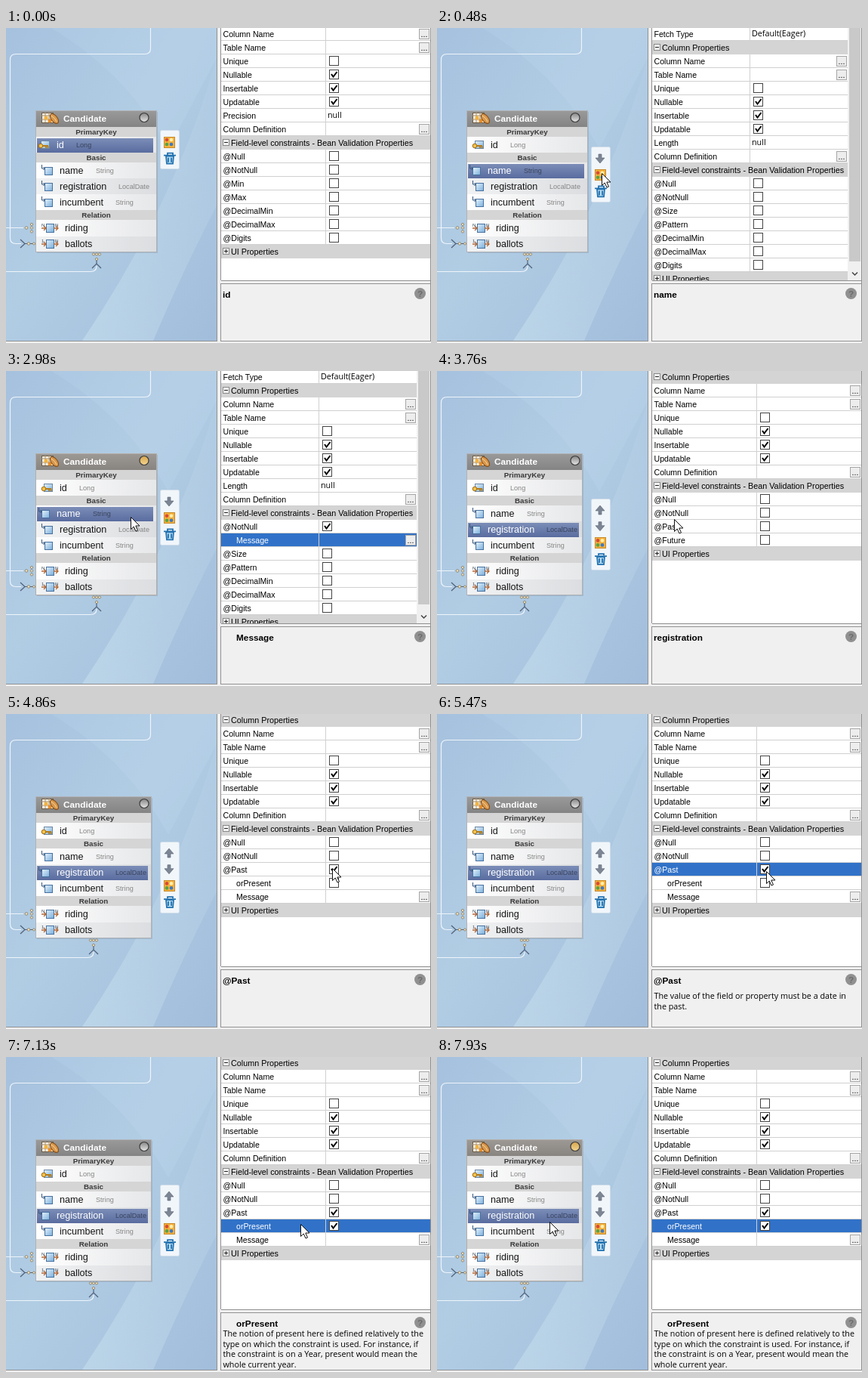
An HTML page that plays this animation: 563x417 px, repeating every 8 s.

```html
<!DOCTYPE html>
<html lang="en">
<head>
<meta charset="utf-8">
<title>Bean validation editor</title>
<style>
html, body { margin: 0; width: 100%; height: 100%; overflow: hidden; background: #f0f0f0; }
svg { display: block; width: 563px; height: 417px; }
text { font: 10.6px "Liberation Sans", Arial, sans-serif; fill: #000; white-space: pre; }
text.section { font-size: 10.8px; }
text.bold { font-size: 11.8px; font-weight: bold; }
text.group { font-size: 9.8px; font-weight: bold; fill: #3a3a3a; text-anchor: middle; }
text.value { font: 10.75px "Open Sans", Tahoma, sans-serif; }
text.attr { font-size: 12.6px; fill: #151515; }
text.type { font-size: 9.1px; fill: #858585; }
text.tiny { font-size: 6px; fill: #345; }
text.light { fill: #fff; }
text.mid { text-anchor: middle; }
rect, .crisp { shape-rendering: crispEdges; }
.soft { shape-rendering: auto; }
.wire { fill: none; stroke: #eef4fa; stroke-width: 1.2; }
.fork { fill: none; stroke: #4f6078; stroke-width: 1.2; }
.dot { fill: #f8e3b8; stroke: #8a8270; stroke-width: .9; }
</style>
</head>
<body>
<svg viewBox="0 0 563 417">
  <defs>
    <linearGradient id="sky" x1="0" y1="0" x2="1" y2="1">
      <stop offset="0" stop-color="#a6c1de"/><stop offset=".45" stop-color="#b1cde4"/><stop offset="1" stop-color="#a2bddb"/>
    </linearGradient>
    <linearGradient id="beam" x1="1" y1="0" x2="0" y2="1">
      <stop offset="0" stop-color="#d8eef6" stop-opacity=".05"/><stop offset="1" stop-color="#d8eef6" stop-opacity=".36"/>
    </linearGradient>
    <linearGradient id="head" x1="0" y1="0" x2="0" y2="1">
      <stop offset="0" stop-color="#999"/><stop offset="1" stop-color="#848484"/>
    </linearGradient>
    <linearGradient id="headHot" x1="0" y1="0" x2="0" y2="1">
      <stop offset="0" stop-color="#9c9894"/><stop offset="1" stop-color="#888480"/>
    </linearGradient>
    <linearGradient id="body"><stop offset="0" stop-color="#fff"/><stop offset="1" stop-color="#e6e7e9"/></linearGradient>
    <linearGradient id="picked" x1="0" y1="0" x2="0" y2="1">
      <stop offset="0" stop-color="#7b8db7"/><stop offset="1" stop-color="#596c9f"/>
    </linearGradient>
    <linearGradient id="silver" x1="0" y1="0" x2="0" y2="1">
      <stop offset="0" stop-color="#858585"/><stop offset="1" stop-color="#e6e6e6"/>
    </linearGradient>
    <linearGradient id="gold" x1="0" y1="0" x2="0" y2="1">
      <stop offset="0" stop-color="#d5a54c"/><stop offset="1" stop-color="#f3d590"/>
    </linearGradient>
    <linearGradient id="glass" x1="0" y1="0" x2="1" y2="1">
      <stop offset="0" stop-color="#e4f2fc"/><stop offset="1" stop-color="#7db0dc"/>
    </linearGradient>

    <!-- Icons are centred on 0,0 -->
    <g id="field">
      <rect x="-4.5" y="-3.5" width="10" height="10" fill="url(#glass)" stroke="#47719f"/>
      <path d="M-8.500-7v5h4M-6.500-4l2 2-2 2" fill="none" stroke="#35557e"/>
    </g>
    <g id="key">
      <rect x="-3.5" y="-4.5" width="11" height="10" fill="url(#glass)" stroke="#6c87a4"/>
      <circle cx="-4" cy="2" r="2.800" fill="#f3c34c" stroke="#a06c12"/>
      <path d="M-1 2H6M3 2v3M5.500 2v3" stroke="#b47d1c" stroke-width="1.800"/>
    </g>
    <g id="link">
      <rect x="-5" y="-5" width="10" height="11" fill="url(#glass)" stroke="#47719f"/>
      <path d="M-11 1h6M-8-2L-5 1l-3 3M5 1h6M8-2l3 3-3 3" fill="none" stroke="#b0683a" stroke-width="1.300"/>
    </g>
    <g id="entity">
      <rect x="-11" y="-7" width="15" height="13" fill="#f6f1e6" stroke="#6c5b44"/>
      <path d="M-11-3H4M-11 2H4M-6-7V6M-1-7V6" stroke="#a98f68"/>
      <circle cx="-5" cy="0" r="2.500" fill="#f3b33e"/><circle cx="0" cy="4" r="2.500" fill="#e88d2c"/>
      <ellipse cx="6" cy="1" rx="4" ry="7.500" transform="rotate(-38 6 1)" fill="#d9974b" stroke="#7e4a18"/>
      <path d="M2-3q5 3 7 8" fill="none" stroke="#f5d6a0"/>
    </g>
    <path id="down" d="M-2-6h4v5h4L0 6-6-1h4z" fill="#7d8694" stroke="#596372" stroke-width=".6"/>
    <g id="up"><use href="#down" transform="scale(1 -1)"/></g>
    <g id="palette">
      <rect x="-7" y="-7" width="14" height="14" fill="#f3b13c" stroke="#c98a2a"/>
      <circle cx="-3" cy="-3" r="2.300" fill="#d84a35"/><circle cx="3" cy="-3" r="2.300" fill="#fff0b0"/>
      <circle cx="-3" cy="3" r="2.300" fill="#56a345"/><circle cx="3" cy="3" r="2.300" fill="#3c78c4"/>
    </g>
    <g id="trash" fill="none" stroke="#2272b0" stroke-width="1.800">
      <path d="M-5-3L-4 7H4L5-3z" fill="#b9dcf3"/><path d="M-8-4H8M-3-5V-7H4v2M-2-1v6M2-1v6"/>
    </g>
    <clipPath id="grid"><rect x="285" width="277" height="334"/></clipPath>
    <clipPath id="canvas"><rect width="279" height="414"/></clipPath>
  </defs>

  <rect width="563" height="417" fill="#f0f0f0"/>
  <g clip-path="url(#canvas)">
    <rect width="279" height="414" fill="url(#sky)"/>
    <path d="M60 0Q160 60 215 160L279 40V0z" fill="#cfe6f2" opacity=".12"/>
    <path d="M279 40Q225 230 101 414H195Q235 320 279 235z" fill="url(#beam)"/>
    <path class="wire" d="M191.500 0V27Q191.500 34.500 184 34.500H13Q5.500 34.500 5.500 42V278Q5.500 285.500 13 285.500H20M0 264.500H23"/>
    <path class="fork" d="M19 280l6 5.500-6 5.500M25 285.500H39"/>
    <g class="dot">
      <circle cx="30" cy="285.500" r="1.800"/><circle cx="37" cy="285.500" r="1.500"/>
      <circle cx="27" cy="264.500" r="1.800"/><circle cx="34" cy="260" r="1.600"/>
      <circle cx="34" cy="264.500" r="1.600"/><circle cx="34" cy="269.500" r="1.600"/>
    </g>
    <g id="card"></g>
  </g>
  <path class="crisp" d="M279.500 0V414M284.500 0V334M284.500 338V414M562.500 0V414M285 334.500H563M285 338.500H563M0 414.500H280M284 414.500H563" stroke="#919191"/>
  <g id="panel"></g>
  <path id="cursor" d="M.5.5V16.500L4.200 13 7 19 9.500 18 6.800 12H12z" fill="#fff" stroke="#111"/>
</svg>

<script>
const LOOP = 8000;
const $ = id => document.getElementById(id);
const rect = (x, y, w, h, fill, extra = '') =>
  `<rect x="${x}" y="${y}" width="${w}" height="${h}" fill="${fill}" ${extra}/>`;
const text = (x, y, s, cls = '') => `<text x="${x}" y="${y}" class="${cls}">${s}</text>`;
const use = (id, x, y) => `<use href="#${id}" x="${x}" y="${y}"/>`;
const path = (d, stroke, extra = '') => `<path d="${d}" fill="none" stroke="${stroke}" ${extra}/>`;

// Rows: "label|value"; 0/1 is a checkbox, "..." a button, a leading -/+ a section
const unset = s => s.split(' ').map(n => `@${n}|0`);
const column = ['Column Name|...', 'Table Name|...', 'Unique|0', 'Nullable|1', 'Insertable|1', 'Updatable|1'];
const section = '-Column Properties';
const definition = 'Column Definition|...';
const bean = '-Field-level constraints - Bean Validation Properties';
const ui = '+UI Properties';
const fetchRows = ['Fetch Type|Default(Eager)', section, ...column, 'Length|null', definition, bean];
const dateRows = [section, ...column, definition, bean, ...unset('Null NotNull')];
const textRules = unset('Size Pattern DecimalMin DecimalMax Digits');
const pastRows = n => [...dateRows, '@Past|1', ` orPresent|${n}`, ' Message|...', ui];

const pastHelp = ['The value of the field or property must be a date in', 'the past.'];
const presentHelp = ['The notion of present here is defined relatively to the',
  'type on which the constraint is used. For instance, if',
  'the constraint is on a Year, present would mean the', 'whole current year.'];

const idRows = [...column, 'Precision|null', definition, bean,
  ...unset('Null NotNull Min Max DecimalMin DecimalMax Digits'), ui];
const scenes = [
  { at: 0, attr: 'id', rows: idRows, title: 'id' },
  { at: 310, attr: 'name', rows: [...fetchRows, ...unset('Null NotNull'), ...textRules, ui], title: 'name', scroll: true },
  { at: 2040, attr: 'name', rows: [...fetchRows, '@NotNull|1', ' Message|...', ...textRules, ui],
    title: ' Message', pick: ' Message', scroll: true },
  { at: 3140, attr: 'registration', rows: [...dateRows, ...unset('Past Future'), ui], title: 'registration' },
  { at: 4860, attr: 'registration', rows: pastRows(0), title: '@Past' },
  { at: 5020, attr: 'registration', rows: pastRows(0), title: '@Past', pick: '@Past', help: pastHelp, helpY: 377 },
  { at: 6670, attr: 'registration', rows: pastRows(1), title: ' orPresent', pick: ' orPresent', help: presentHelp, helpY: 370 },
];

// Cursor moves: first step, last step, steps, x, y; no position hides it
const moves = [
  [160, 160, 1, 150, 190], [470, 620, 2, 286, 193],
  [940, 1580, 5, 431, 219], [1740, 1740, 1, 428, 221], [2520],
  [2820, 2820, 1, 178, 188], [2980, 2980, 1, 165, 193], [3140, 3140, 1, 152, 207],
  [3460, 3760, 3, 314, 196], [4080, 4230, 2, 373, 191], [4390, 4540, 2, 432, 204],
  [5170, 5630, 4, 440, 212], [6050, 6510, 4, 433, 224], [6990, 7610, 5, 218, 207],
  [7930, 7930, 1, 149, 218],
];

function cursorAt(t) {
  let pos = null;
  for (const [start, end, n, x, y] of moves) {
    if (t < start) break;
    if (!n) { pos = null; continue; }
    const step = n > 1 ? Math.min(n, 1 + Math.floor((t - start) / (end - start) * (n - 1) + .01)) : 1;
    const from = pos || [x, y], p = step / n;
    pos = [from[0] + (x - from[0]) * p, from[1] + (y - from[1]) * p].map(Math.round);
  }
  return pos;
}

function checkbox(x, y, on) {
  return rect(x + .5, y - 6.5, 12, 12, '#fff', 'stroke="#444"') +
    (on ? path(`M${x + 3} ${y - 1}l2.500 3.500 5-6.500`, '#000', 'stroke-width="2"') : '');
}

function row(spec, i, scene, split, right) {
  const y = 8 + 18 * i, top = y - 9, kind = spec[0];
  if (kind === '-' || kind === '+') {
    return rect(285, top, right - 285, 18, '#d4d4d4') +
      rect(287.5, y - 4.5, 8, 8, '#f4f4f4', 'stroke="#888"') +
      path(`M289 ${y - .5}h5` + (kind === '+' ? `M291.500 ${y - 3}v5` : ''), '#222', 'class="crisp"') +
      text(298, y + 4, spec.slice(1), 'section');
  }
  const [label, value] = spec.split('|');
  const picked = label === scene.pick;
  let out = picked ? rect(285, top, right - 285, 17, '#3172c8') : '';
  out += path(`M285 ${y + 8.5}H${right}M${split - .5} ${top}v18`, '#d0d0d0', 'class="crisp"');
  out += text(label[0] === ' ' ? 305 : 287.5, y + 4, label.trim(), picked ? 'light' : '');
  if (value === '...') {
    out += rect(right - 14.5, y - 6.5, 13, 13, '#ededed', 'stroke="#a5a5a5"') + text(right - 12.500, y + 4, '...');
  } else if (value === '0' || value === '1') {
    out += checkbox(split + 4, y, value === '1');
  } else {
    out += text(split + 2, y + 2.500, value, 'value');
  }
  return out;
}

function drawPanel(s) {
  const split = s.scroll ? 415 : 424, right = s.scroll ? 544 : 562;
  let out = rect(285, 0, right - 285, 334, '#fff') +
    s.rows.map((r, i) => row(r, i, s, split, right)).join('');
  if (s.scroll) {
    out += rect(544, 0, 18, 334, '#f0f0f0') + rect(546, 0, 15, 309, '#c9c9c9') +
      path('M550 323.500l3.500 3.500 3.500-3.500', '#444', 'stroke-width="1.500"');
  }
  out = `<g clip-path="url(#grid)">${out}</g>`;
  out += text(s.title[0] === ' ' ? 305 : 287, 357, s.title.trim(), 'bold');
  out += '<circle cx="548.500" cy="351.500" r="7.500" fill="#909090"/>' +
    '<text x="548.500" y="355.500" class="bold mid" style="fill:#6c6c6c">?</text>';
  (s.help || []).forEach((line, i) => out += text(287.5, s.helpY + 13.7 * i, line, 'value'));
  return out;
}

// name, type, icon, centre y, type x
const attrs = [
  ['id', 'Long', 'key', 155, 97], ['name', 'String', 'field', 189, 119],
  ['registration', 'LocalDate', 'field', 210, 149], ['incumbent', 'String', 'field', 231, 145],
];

function drawCard(s, hover) {
  const w = s.attr === 'registration' ? 153 : 160, mid = 39.5 + w / 2;
  const dx = s.attr === 'registration' ? 116 : 120;
  let out = `<path class="wire" d="M0 322.500H${dx - 8}Q${dx} 322.500 ${dx} 315"/>` +
    `<path class="fork" d="M${dx - 6} 318l6-6 6 6M${dx} 312V307"/>` +
    [[-4, 299.5], [0, 299.5], [4, 299.5], [0, 306]].map(([x, y]) => `<circle class="dot" cx="${dx + x}" cy="${y}" r="1.600"/>`).join('');
  out += rect(41, 111, w, 187, '#567', 'opacity=".2"');
  out += rect(39.5, 109.5, w, 187, 'url(#body)');
  for (const y of [199, 276]) out += rect(40, y, w - 1, 21, '#8e949c', 'opacity=".12"');
  out += rect(40, 110, w - 1, 21, `url(#${hover ? 'headHot' : 'head'})`);
  out += use('entity', 58, 119) + text(76, 123.500, 'Candidate', 'bold light');
  out += `<circle cx="183" cy="118.500" r="6" fill="url(#${hover ? 'gold' : 'silver'})" stroke="#3c3c3c" stroke-width="1.200"/>`;
  [['PrimaryKey', 131], ['Basic', 165], ['Relation', 241]].forEach(([name, y]) =>
    out += rect(40, y, w - 1, 13, '#d5d5d5') + text(mid, y + 10, name, 'group'));
  for (const [name, type, icon, y, tx] of attrs) {
    const on = name === s.attr, shift = on ? -4 : 0;
    if (on) out += rect(41, y - 9, w - 6, 19, 'url(#picked)');
    out += use(icon, 56 + shift - (icon === 'key' ? 2 : 0), y - 1) +
      text(71 + shift, y + 4, name, on ? 'attr light' : 'attr') +
      `<text x="${tx + shift}" y="${y + 3}" class="type"${on ? ' style="fill:#39435c"' : ''}>${type}</text>`;
  }
  [['riding', 265, 'N'], ['ballots', 286, '1']].forEach(([name, y, n]) =>
    out += use('link', 58, y - 1) + text(47, y - 2, n, 'tiny') + text(65, y - 2, 'N', 'tiny') + text(78, y + 4, name, 'attr'));
  out += rect(39.5, 109.5, w, 187, 'none', `stroke="${hover ? '#b5aea6' : '#b0b3b8'}"`);
  return out + drawTools(s.attr);
}

function drawTools(attr) {
  const all = ['up', 'down', 'palette', 'trash'];
  const [skip, top, first, h] = { id: [2, 136, 151, 51], name: [1, 158, 173, 73], registration: [0, 170, 184, 94] }[attr];
  return rect(204.5, top - .5, 25, h, '#f7fafd', 'rx="2" class="soft" opacity=".92" stroke="#d3dfeb"') +
    all.slice(skip).map((icon, i) => use(icon, icon === 'trash' ? 217 : 216, first + 21.7 * i)).join('');
}

let shown = '';
function frame() {
  const t = performance.now() % LOOP;
  const pos = cursorAt(t);
  const hover = !!pos && pos[0] < 199 && pos[1] > 109 && pos[1] < 297;
  const scene = scenes.filter(s => s.at <= t).pop();
  const key = scene.at + '/' + hover;
  if (key !== shown) {
    $('card').innerHTML = drawCard(scene, hover);
    $('panel').innerHTML = drawPanel(scene);
    shown = key;
  }
  const [x, y] = pos || [-99, -99];
  $('cursor').setAttribute('transform', `translate(${x} ${y})`);
  requestAnimationFrame(frame);
}
frame();
</script>
</body>
</html>
```
